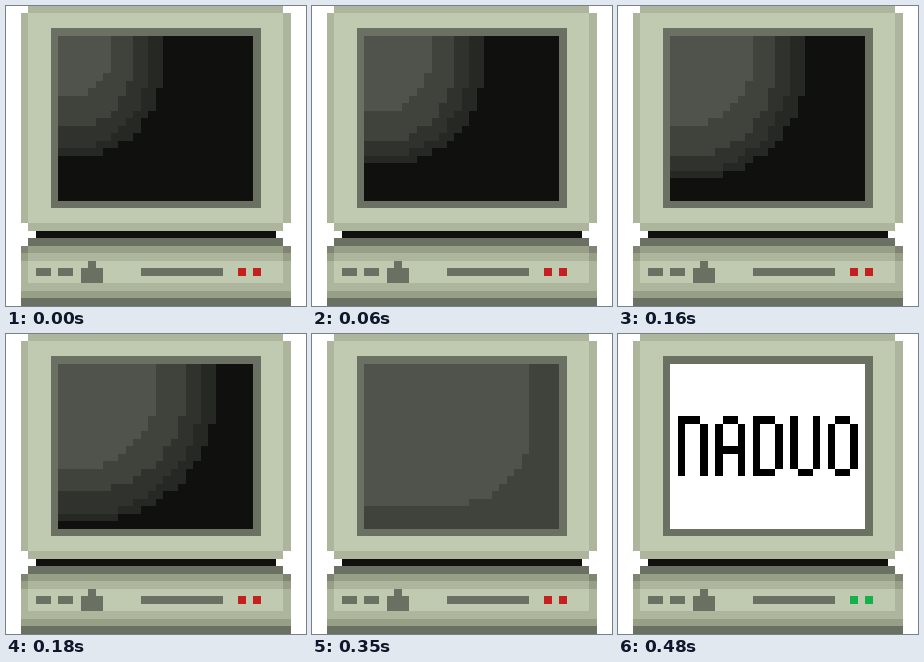
Recreate the animation shown at these times as an HTML page. Size 300x300 px, loop 540 ms.

```html
<!DOCTYPE html>
<html lang="en">
<head>
<meta charset="utf-8">
<title>Old computer starting up</title>
<style>
  html, body { margin: 0; width: 100%; height: 100%; overflow: hidden; background: #fff; }
  svg { display: block; width: 100%; height: 100%; }
</style>
</head>
<body>
<svg id="stage" viewBox="0 0 300 300" shape-rendering="crispEdges" role="img" aria-label="NADUO"></svg>
<script>
const stage = document.getElementById('stage');
const COLOR = {
  light: '#c0cab0', pale: '#adb69c', mid: '#97a086', edge: '#7f8572', gray: '#6b7162',
  black: '#10110e', red: '#c4201f', green: '#14b04b'
};

// All shapes sit on a 40 x 40 grid of 7.5 px cells, snapped to whole pixels.
const snap = cell => Math.floor(cell * 7.5);

// Rectangle from cell (x0, y0) up to, but not including, cell (x1, y1).
const box = (x0, y0, x1, y1) =>
  `M${snap(x0)} ${snap(y0)}H${snap(x1)}V${snap(y1)}H${snap(x0)}Z`;

function shape(fill, d = '') {
  const path = document.createElementNS('http://www.w3.org/2000/svg', 'path');
  path.setAttribute('fill', fill);
  path.setAttribute('d', d);
  return stage.appendChild(path);
}

const LEFT = 7, TOP = 4;
const SCREEN = box(LEFT, TOP, 33, 26);

// Monitor case
shape(COLOR.pale, box(3, 0, 37, 30) + box(2, 1, 38, 29));
shape(COLOR.light, box(3, 1, 37, 29));
shape(COLOR.gray, box(6, 3, 34, 27));
shape(COLOR.black, box(4, 30, 36, 31));

// Base unit
shape(COLOR.gray, box(3, 31, 37, 32) + box(2, 39, 38, 40));
shape(COLOR.edge, box(2, 32, 38, 33));
shape(COLOR.mid, box(3, 32, 37, 33) + box(2, 33, 38, 39));
shape(COLOR.pale, box(3, 33, 37, 34) + box(2, 34, 38, 38));
shape(COLOR.light, box(3, 34, 37, 37));
shape(COLOR.gray, box(4, 35, 6, 36) + box(7, 35, 9, 36) +
  box(11, 34, 12, 35) + box(10, 35, 13, 37) + box(18, 35, 29, 36));

const lights = shape(COLOR.red, box(31, 35, 32, 36) + box(33, 35, 34, 36));
const screen = shape(COLOR.black, SCREEN);

// Glare bands, outermost first, with their starting size in cells.
const [outer, dim, soft, bright] = [
  ['#262824', 13.8, 15.5],
  ['#30322d', 11.8, 14.5],
  ['#40433c', 9.8, 12],
  ['#50534b', 6.5, 8.4]
].map(([fill, width, height]) => ({ width, height, path: shape(fill) }));
const bands = [outer, dim, soft, bright];

// Quarter superellipse growing from the screen's top left corner, one box per row.
function quarter(width, height, power) {
  const cols = Math.round(width), rows = Math.round(height);
  let d = '';
  for (let row = 0; row < rows; row++) {
    const y = (row + 0.5) / (rows + 0.4);
    const reach = (cols + 0.4) * (1 - y ** power) ** (1 / power);
    d += box(LEFT, TOP + row, LEFT + Math.min(cols, Math.round(reach)), TOP + row + 1);
  }
  return d;
}

function drawGlare(step) {
  for (const { path, width, height } of bands) {
    path.setAttribute('d', step < 4 ? quarter(width + 2.3 * step, height + 1.8 * step, 2.4) : '');
  }
  if (step === 4) {
    soft.path.setAttribute('d', SCREEN);
    bright.path.setAttribute('d', quarter(22, 19, 3.8));
  }
}

// Each letter is two posts between a top and a bottom cap, some with a crossbar.
const ROUND = '.##.', LEGS = '#..#', SQUARE = '###.';
const LETTERS = {
  N: { top: SQUARE, bottom: LEGS },
  A: { top: ROUND, bottom: LEGS, bar: true },
  D: { top: SQUARE, bottom: SQUARE },
  U: { top: LEGS, bottom: ROUND },
  O: { top: ROUND, bottom: ROUND }
};

const cap = (pattern, x, y) =>
  [...pattern].map((c, i) => c === '#' ? box(x + i, y, x + i + 1, y + 1) : '').join('');

function letterOutline(letter, index) {
  const { top, bottom, bar } = LETTERS[letter];
  const x = 8 + index * 5, y = 11;
  return cap(top, x, y) + cap(bottom, x, y + 7) +
    box(x, y + 1, x + 1, y + 7) + box(x + 3, y + 1, x + 4, y + 7) +
    (bar ? cap(ROUND, x, y + 4) : '');
}

const word = shape('#000', [...'NADUO'].map(letterOutline).join(''));

const LOOP = 540, STEP = 60, POWER_ON = 420, WORD_ON = 480;

function draw(time) {
  const t = time % LOOP;
  const on = t >= POWER_ON;
  screen.setAttribute('fill', on ? '#fff' : COLOR.black);
  lights.setAttribute('fill', on ? COLOR.green : COLOR.red);
  word.setAttribute('visibility', t >= WORD_ON ? 'visible' : 'hidden');
  drawGlare(on ? 5 : Math.min(4, Math.floor(t / STEP)));
}

const begin = performance.now();
function tick() {
  draw(performance.now() - begin);
  requestAnimationFrame(tick);
}
tick();
</script>
</body>
</html>
```
